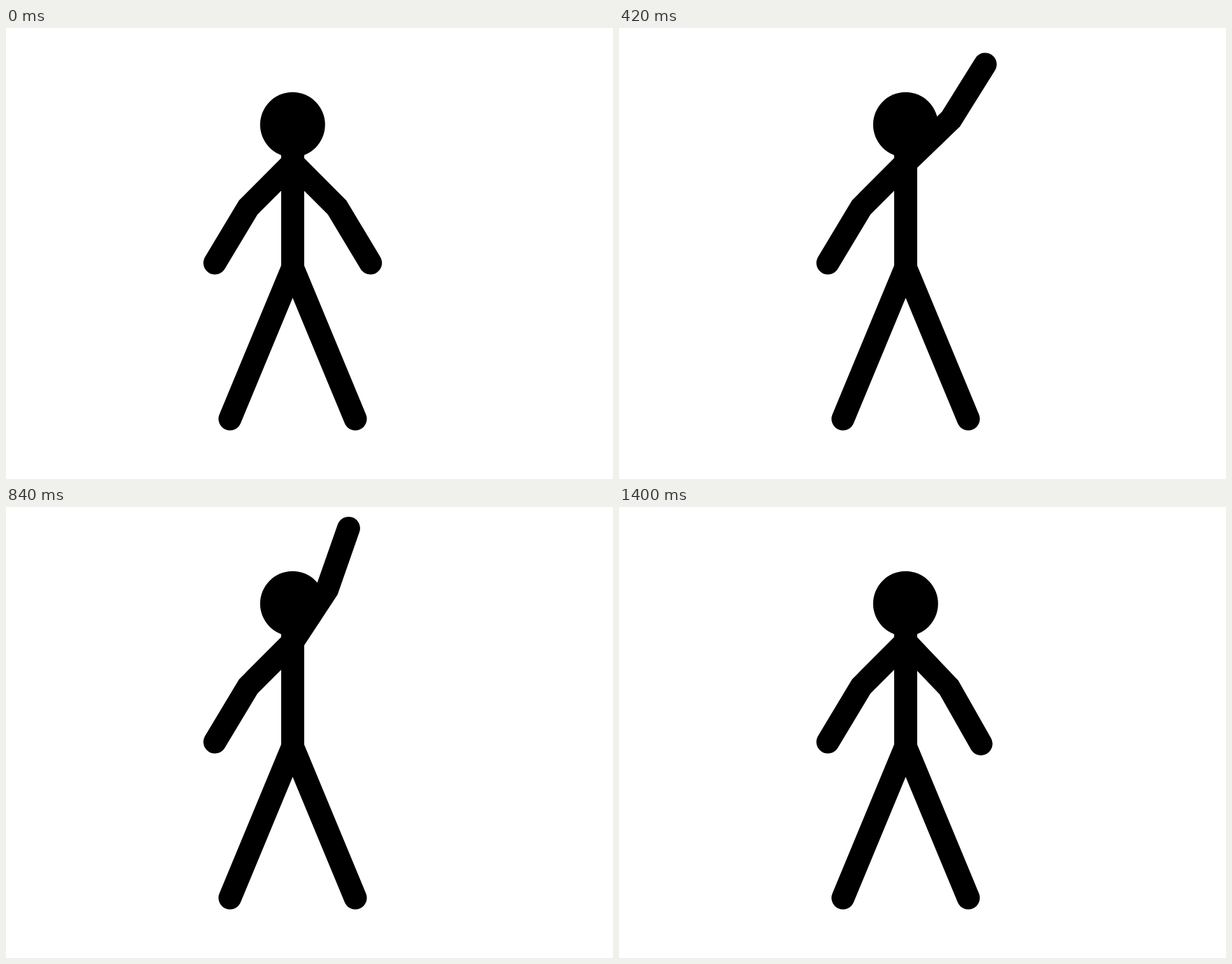
Animation, 869 px wide and 645 px high, one loop 1.54 s. Source, as an HTML page:

```html
<!DOCTYPE html>
<html lang="en">
<head>
<meta charset="utf-8">
<title>Waving stick figure</title>
<style>
  html, body { margin: 0; width: 100%; height: 100%; overflow: hidden; background: #fff; }
  svg { display: block; width: 869px; height: 645px; }
  path { fill: none; stroke: #000; stroke-width: 33; stroke-linecap: round; }
</style>
</head>
<body>
<svg viewBox="0 0 869 645">
  <circle cx="410.3" cy="138.3" r="46.5"/>
  <path d="M410.4 150V343"/>
  <path d="M320.7 559L410.4 343L500.1 559"/>
  <path id="still"/>
  <path id="waving"/>
</svg>
<script>
  const STEP = 140;
  const SHOULDER = { x: 410.4, y: 193 };
  const UPPER = 90, FORE = 92.6, BEND = 14;

  // Upper arm angle at each step, in degrees below horizontal
  const swing = [45, 31.4, -9.9, -44, -7, -25, -56.7, -32.9, 12.7, 46.7, 46.4];

  const still = document.getElementById("still");
  const waving = document.getElementById("waving");

  // A rigid two-part arm; side is 1 for right, -1 for left
  function armPath(side, angle, bend) {
    const limb = (length, deg) => {
      const a = deg * Math.PI / 180;
      return `l${side * length * Math.cos(a)} ${length * Math.sin(a)}`;
    };
    return `M${SHOULDER.x} ${SHOULDER.y}` + limb(UPPER, angle) + limb(FORE, angle + bend);
  }

  function draw(ms) {
    const i = Math.floor(ms / STEP) % swing.length;
    const resting = i === 0 || i === swing.length - 1;
    // The elbow hangs at rest and flexes upward during the wave
    waving.setAttribute("d", armPath(1, swing[i], resting ? BEND : -BEND));
  }

  let start;
  function tick(now) {
    start ??= now;
    draw(now - start);
    requestAnimationFrame(tick);
  }

  still.setAttribute("d", armPath(-1, swing[0], BEND));
  draw(0);
  requestAnimationFrame(tick);
</script>
</body>
</html>
```
